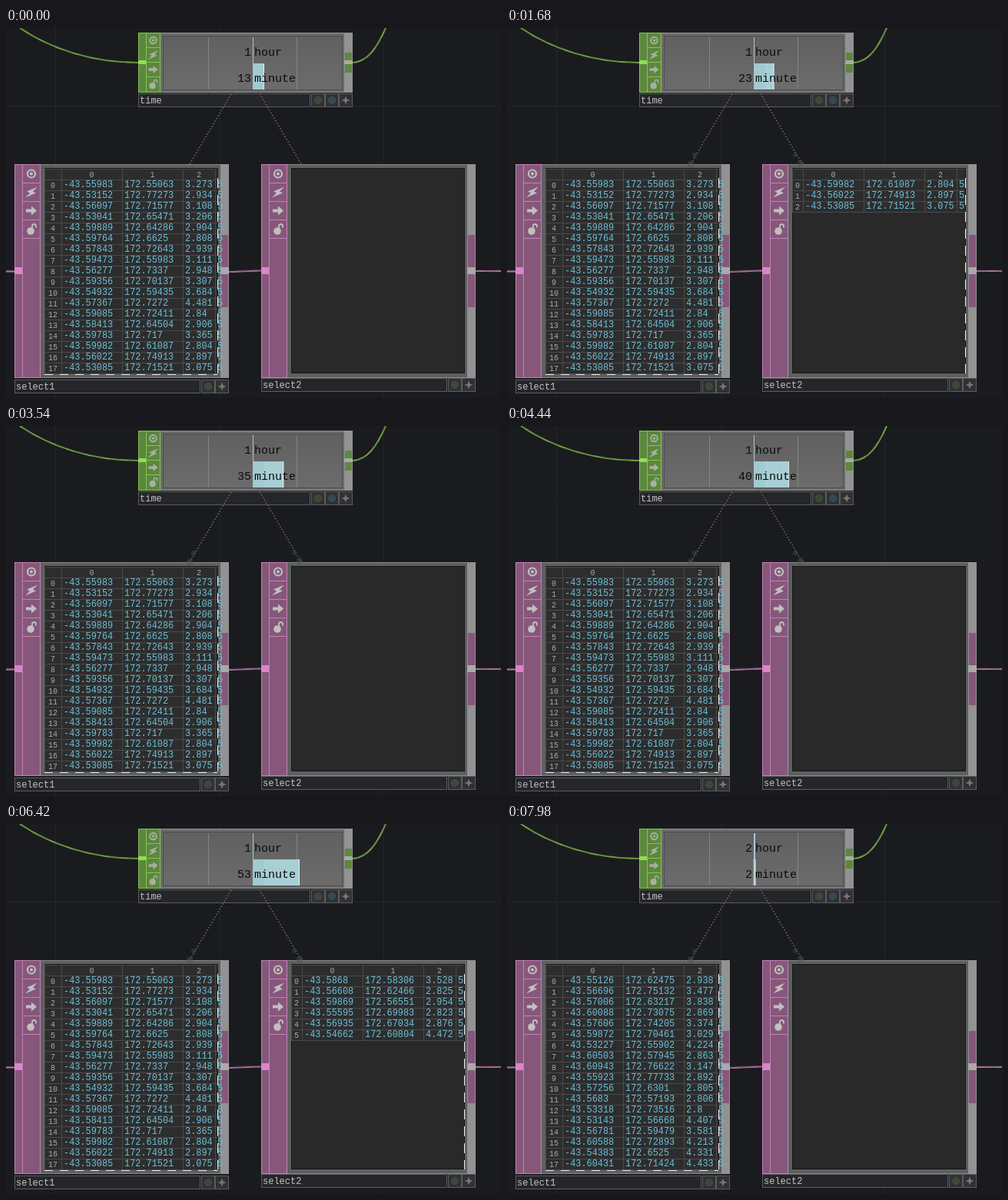
An HTML page that plays this animation: 644x481 px, repeating every 8 s.

```html
<!DOCTYPE html>
<html lang="en">
<head>
<meta charset="utf-8">
<title>Node network</title>
<style>
html, body { margin: 0; width: 100%; height: 100%; overflow: hidden; background: #1a1b1f; }
svg { display: block; width: 644px; height: 481px; }
text { font-family: "Liberation Mono", "DejaVu Sans Mono", monospace; white-space: pre; }
</style>
</head>
<body>
<svg id="stage" viewBox="0 0 644 481" xmlns="http://www.w3.org/2000/svg"></svg>
<script>
const LOOP = 8000, TICK = 60, MINUTE = 159.5, LEAD = 48, START = 13;

function seeded(seed) {
  return () => {
    seed = seed + 0x6D2B79F5 | 0;
    let v = Math.imul(seed ^ seed >>> 15, 1 | seed);
    v = v + Math.imul(v ^ v >>> 7, 61 | v) ^ v;
    return ((v ^ v >>> 14) >>> 0) / 2 ** 32;
  };
}

// Latitude, longitude, magnitude and depth, clustered around one place.
function quakes(seed, count) {
  const random = seeded(seed);
  const between = (low, span, digits, power = 1) => +(low + span * random() ** power).toFixed(digits);
  return Array.from({ length: count }, () =>
    [between(-43.61, .08, 5), between(172.55, .23, 5), between(2.8, 1.7, 3, 2), 5]);
}
const first = quakes(1, 36), second = quakes(2, 18);

// Minutes [from, to) during which the second table has matching rows.
const MATCHES = [
  { from: 16, to: 18, rows: first.slice(13, 15) },
  { from: 20, to: 25, rows: first.slice(15, 18) },
  { from: 30, to: 33, rows: first.slice(18, 20) },
  { from: 50, to: 58, rows: first.slice(30) },
  { from: 60, to: 61, rows: second.slice(0, 1) }
];

const rect = (x, y, w, h, fill, extra = '') =>
  `<rect x="${x}" y="${y}" width="${w}" height="${h}" fill="${fill}" ${extra}/>`;
const line = (x1, y1, x2, y2, stroke, extra = '') =>
  `<path d="M${x1} ${y1}L${x2} ${y2}" stroke="${stroke}" fill="none" ${extra}/>`;
const text = (x, y, size, fill, str, anchor = 'start') =>
  `<text x="${x}" y="${y}" font-size="${size}" fill="${fill}" text-anchor="${anchor}">${str}</text>`;
const at = (x, y, scale, body) =>
  `<g transform="translate(${x} ${y}) scale(${scale})">${body}</g>`;

const ICONS = [
  '<circle r="5" fill="none" stroke="#c2bfc1" stroke-width="2.2"/><circle r="2" fill="#c2bfc1"/>',
  '<path d="M8-7L-6-1-2 1-8 7 6 1 2-1Z" fill="#c2bfc1"/>',
  '<path d="M-7-2H0V-6L7 0 0 6V2H-7Z" fill="#c2bfc1"/>',
  '<circle cx="-1" cy="2.5" r="4.8" fill="#c2bfc1"/><path d="M1-1V-4a2.5 2.5 0 0 1 5 0v2" fill="none" stroke="#c2bfc1" stroke-width="1.8"/>'
];

function nameBar(x, y, width, label, buttons) {
  const frame = 'stroke="#5b5c5e"';
  let out = rect(x + .5, y + .5, width, 17, '#25262a', frame) + text(x + 2, y + 13, 12, '#c4c4c4', label);
  buttons.forEach((color, i) => {
    const bx = x + 279 - 18 * (buttons.length - i);
    out += rect(bx + .5, y + .5, 17, 17, '#303134', frame);
    out += color
      ? `<circle cx="${bx + 9}" cy="${y + 9}" r="4.5" fill="${color}" stroke="#494b4c"/>`
      : at(bx + 9, y + 9, 1, '<path d="M0-5.5L1.5-1.5 5.5 0 1.5 1.5 0 5.5-1.5 1.5-5.5 0-1.5-1.5Z" fill="#777"/>');
  });
  return out;
}

function tableNode(x, y, label, nameY) {
  let out = rect(x, y, 279, 278, '#5e5f60') + rect(x + .5, y + .5, 278, 277, 'none', 'stroke="#858585"');
  out += rect(x + .5, y + .5, 33, 277, '#86577a', 'stroke="#c481b5"') +
    line(x + 10.5, y, x + 10.5, y + 278, '#c481b5');
  ICONS.forEach((icon, i) => {
    out += at(x + 22, y + 12.5 + 24 * i, 1, icon) +
      line(x + 11, y + 24.5 + 24 * i, x + 33, y + 24.5 + 24 * i, '#c481b5');
  });
  out += rect(x + 39.5, y + 5.5, 225, 266, '#292929', 'stroke="#171717"');
  out += rect(x + 268, y, 11, 278, '#929292') + rect(x + 269, y + 92, 9, 94, '#86577a');
  out += rect(x, y + 134, 10, 9, '#dc84cb') + rect(x + 268, y + 134, 11, 9, '#aaa');
  return out + nameBar(x, nameY, 241, label, ['#3b4935', null]);
}

function table(x, rows, headWidth) {
  if (!rows.length) return '';
  const top = 183, body = 197, step = 14, right = x + 225;
  const starts = [0, 79, 158, 200].map(v => x + headWidth + v);
  const bottom = Math.min(body + rows.length * step, 449);
  let out = rect(x, top, 225, bottom - top, '#2d2d2d');
  [x, ...starts].forEach(v => { out += line(v + .5, top, v + .5, bottom, '#4a4a4a'); });
  out += line(x, top + .5, right, top + .5, '#4a4a4a');
  for (let y = body; y <= bottom; y += step) out += line(x, y + .5, right, y + .5, '#4a4a4a');
  for (let c = 0; c < 3; c++) {
    out += text((starts[c] + starts[c + 1]) / 2, 194, 10, '#aaa', c, 'middle');
  }
  rows.forEach((row, r) => {
    const y = body + 10 + r * 13.98;
    out += text(x + headWidth / 2, y + 1, 10, '#aaa', r, 'middle');
    row.forEach((cell, c) => { out += text(starts[c] + 3, y, 11.9, '#6dbfd8', cell); });
  });
  return out + line(right + .5, 195, right + .5, 449, '#eee', 'stroke-dasharray="13 9"');
}

function timeNode() {
  let out = rect(172, 6, 279, 78, '#6b6b6b') + rect(172.5, 6.5, 278, 77, 'none', 'stroke="#929292"');
  out += rect(172.5, 6.5, 28, 77, '#5d8740', 'stroke="#85c452"') + line(182.5, 6, 182.5, 84, '#85c452');
  ICONS.forEach((icon, i) => {
    out += `<g opacity=".75">${at(191.5, 16 + 19 * i, .85, icon)}</g>`;
    if (i) out += line(183, 6.5 + 19 * i, 200, 6.5 + 19 * i, '#85c452');
  });
  out += rect(205, 11, 232, 70, 'url(#screen)') + rect(204.5, 10.5, 233, 70, 'none', 'stroke="#4c4c4c"');
  [263.5, 378.5].forEach(x => { out += line(x, 12, x, 80, '#858585'); });
  out += rect(440, 7, 11, 76, '#929292') + rect(441, 32, 9, 10, '#5d8740') + rect(441, 47, 9, 11, '#5d8740') +
    rect(440, 42, 11, 5, '#aaa') + rect(172, 42, 10, 5, '#8fe052');
  out += '<g id="bars"></g>' + line(321.5, 12, 321.5, 80, '#bbb', 'stroke-dasharray="1 1"');
  out += text(323, 36, 15, '#0b0b0b', 'hour') + text(323, 70, 15, '#0b0b0b', 'minute');
  out += `<g id="hour">${text(319, 36, 15, '#0b0b0b', '', 'end')}</g>` +
    `<g id="minute">${text(319, 70, 15, '#0b0b0b', '', 'end')}</g>`;
  return out + nameBar(172, 85, 223, 'time', ['#3b4935', '#2f4b58', null]);
}

const wire = (d, base, glow) =>
  `<path d="${d}" fill="none" stroke="${base}" stroke-width="2"/>` +
  `<path class="flow" d="${d}" fill="none" stroke="${glow}" stroke-width="2" stroke-dasharray="10 14" opacity=".3"/>`;

const gridLines = [64.5, 278.5, 491.5].map(x => line(x, 0, x, 481, '#24252a')).join('') +
  [101.5, 314.5].map(y => line(0, y, 644, y, '#24252a')).join('');
const dots = 'stroke-width="1.6" stroke-dasharray="1.6 2.4"';
const arrow = '<path d="M0 6L-5-5 0-3 5-5Z"/>';

const stage = document.getElementById('stage');
stage.innerHTML =
  `<defs><linearGradient id="screen" x2="0" y2="1"><stop stop-color="#606060"/><stop offset="1" stop-color="#6c6c6c"/></linearGradient>
  <clipPath id="clip"><path d="M371 182H598V449H371Z"/></clipPath></defs>` +
  rect(0, 0, 644, 481, '#1a1b1f') + gridLines +
  wire('M18 0C58 27 112 45 172 45', '#66933f', '#80b853') +
  wire('M451 45C470 44 482 27 494 0', '#66933f', '#80b853') +
  line(0, 316.5, 12, 316.5, '#b777a9', 'stroke-width="2"') +
  wire('M290 317C306 317 316 315.5 332 315.5', '#9b668f', '#c481b5') +
  wire('M610 316H644', '#9b668f', '#c481b5') +
  timeNode() + tableNode(11, 177, 'select1', 457) + tableNode(332, 177, 'select2', 455) +
  '<g id="list"></g>' +
  line(50, 450.5, 275, 450.5, '#eee', 'stroke-dasharray="11 9"') +
  '<g id="matches" clip-path="url(#clip)"></g>' +
  line(297, 79, 236, 182, '#66676b', dots) + line(328, 82, 386, 180, '#66676b', dots) +
  `<g id="tint" fill="#405b3d" opacity=".4"><circle cx="239" cy="177" r="4.5"/><circle cx="244" cy="165" r="3"/><circle cx="382" cy="176" r="4.5"/><circle cx="375" cy="165" r="3"/></g>` +
  `<g id="arrows"><g>${arrow}</g><g>${arrow}</g></g>`;

const [bars, hourText, minuteText, list, matches, tint, arrows] =
  ['bars', 'hour', 'minute', 'list', 'matches', 'tint', 'arrows'].map(id => document.getElementById(id));
const flows = document.querySelectorAll('.flow');
let shownMinute = -1;

function showMinute(total) {
  const hour = 1 + Math.floor(total / 60), minute = total % 60;
  hourText.firstChild.textContent = hour;
  minuteText.firstChild.textContent = minute;
  const width = minute * 1.15;
  let out = rect(321, 12, hour, 34, '#9ccdd5') + rect(321, 46, width, 34, '#a0cbd1');
  for (let k = hour > 1 ? 0 : START + 1; k <= minute; k += 2) {
    out += rect(321 + k * 1.15 - 1, 46, 1, 34, '#e0eef0', 'opacity=".3"');
  }
  bars.innerHTML = out + rect(320 + width, 46, 1, 34, '#e0eef0');
  list.innerHTML = table(50, hour > 1 ? second : first.slice(0, 18), 22);
  const match = MATCHES.find(m => total >= m.from && total < m.to);
  matches.innerHTML = table(371, match ? match.rows : [], 14);
}

function render(now) {
  const step = Math.floor(now % LOOP / TICK) * TICK;
  const time = Math.max(0, step - TICK) + LEAD;
  const total = START + Math.floor(time / MINUTE);
  if (total !== shownMinute) showMinute(shownMinute = total);

  // Arrows flash near the link ends as each minute turns.
  const phase = (time + 6) % MINUTE;
  arrows.style.display = phase < 12 && step ? '' : 'none';
  arrows.setAttribute('fill', phase < 5 ? '#536b59' : '#6d7072');
  const back = phase * .55;
  const [left, right] = arrows.children;
  left.setAttribute('transform', `translate(${242 + back} ${171 - 1.6 * back}) rotate(31)`);
  right.setAttribute('transform', `translate(${378 - back} ${171 - 1.6 * back}) rotate(-31)`);
  tint.style.display = step ? '' : 'none';
  flows.forEach(path => path.setAttribute('stroke-dashoffset', -time / 15));
}

function loop() {
  render(performance.now());
  requestAnimationFrame(loop);
}
loop();
</script>
</body>
</html>
```
